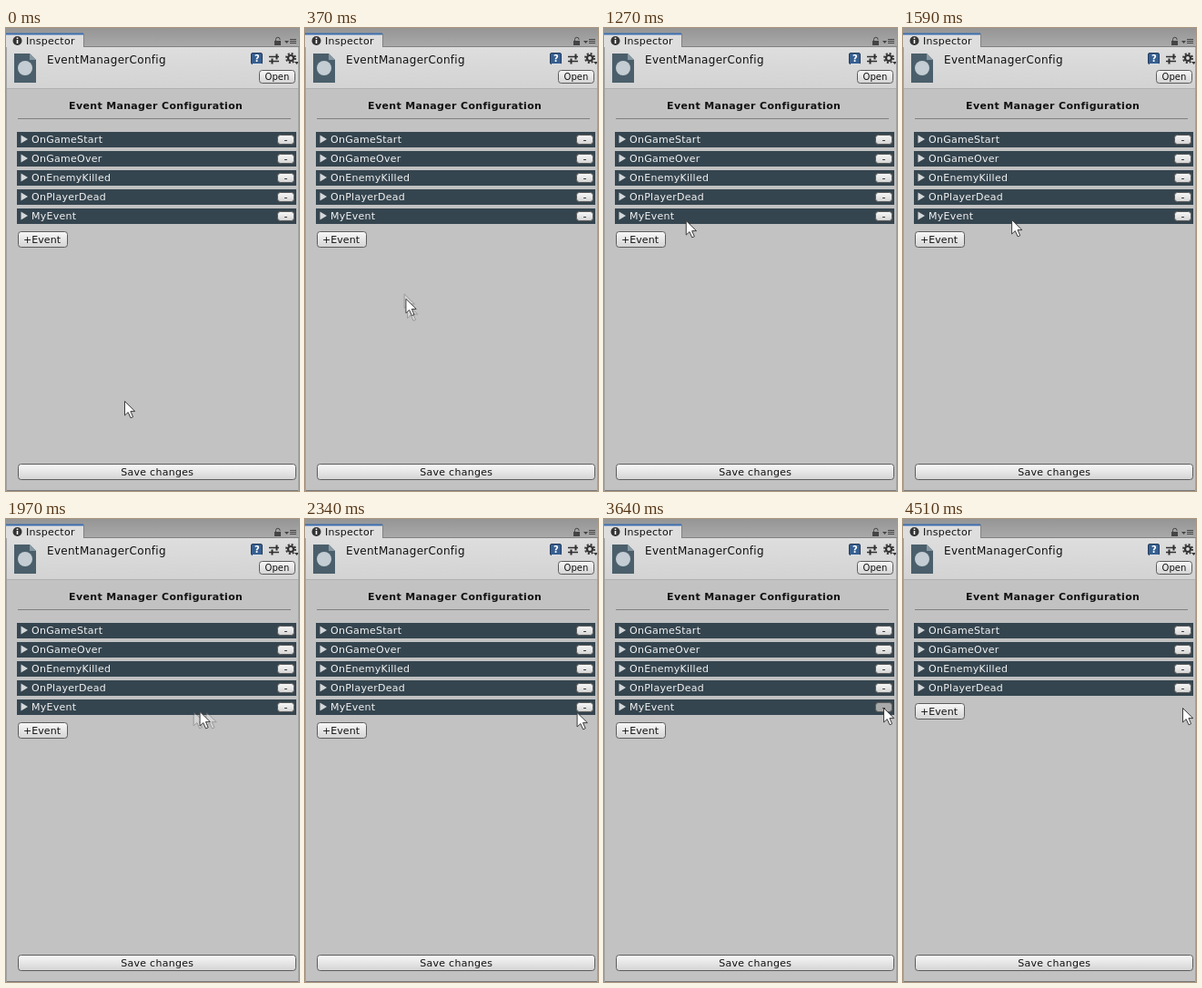
Write an HTML page that moves like this. It is 322 px wide and 508 px high and loops after 7640 ms.

```html
<!DOCTYPE html>
<html lang="en">
<head>
<meta charset="utf-8">
<title>Event manager inspector</title>
<style>
  html, body { margin: 0; width: 100%; height: 100%; overflow: hidden; background: #c2c2c2; }
  svg { display: block; width: 322px; height: 508px; }
  text { font: 11px "DejaVu Sans", sans-serif; letter-spacing: .27px; fill: #111; }
  .title { font-weight: bold; letter-spacing: .33px; }
  .asset { font-size: 12px; letter-spacing: .3px; }
  .small { font-size: 10px; letter-spacing: .1px; }
  .mid { text-anchor: middle; }
  .row text { fill: #f2f2f2; }
  .row .minus { fill: #222; }
  .button { fill: url(#face); stroke: #5c5c5c; }
</style>
</head>
<body>
<svg viewBox="0 0 322 508">
  <defs>
    <linearGradient id="face" x2="0" y2="1">
      <stop stop-color="#f8f8f8"/><stop offset="1" stop-color="#d4d4d4"/>
    </linearGradient>
    <linearGradient id="bar" x2="0" y2="1">
      <stop stop-color="#959595"/><stop offset="1" stop-color="#a9a9a9"/>
    </linearGradient>
    <linearGradient id="head" x2="0" y2="1">
      <stop stop-color="#dedede"/><stop offset="1" stop-color="#d3d3d3"/>
    </linearGradient>
    <path id="arrow" d="M.5 .5V16L4.2 12.6L7 18.8L9.6 17.7L6.9 11.6H11.8Z"
      fill="#fff" stroke="#3c3c3c" stroke-linejoin="round"/>
  </defs>

  <rect width="322" height="508" fill="#c2c2c2"/>
  <rect width="322" height="20" fill="url(#bar)"/>
  <rect y="20" width="322" height="46" fill="url(#head)"/>
  <path d="M0 66.5H322" stroke="#b0b0b0"/>
  <path d="M0 21V6H85V21" fill="#dedede"/>
  <path d="M0 6.5H85" stroke="#3d6fb0" stroke-width="2"/>
  <path d="M85.5 6V20M85 20.5H322" stroke="#828282"/>
  <circle cx="12.5" cy="14" r="5" fill="#333"/>
  <path d="M12.5 13V17M12.5 10.5V12" stroke="#fff" stroke-width="1.6"/>
  <text x="22" y="18">Inspector</text>

  <g fill="none" stroke="#444">
    <path d="M296.5 14V12.5A2.2 2.2 0 0 1 301 12.5V13"/>
    <rect x="295" y="14" width="7" height="5" fill="#444" stroke="none"/>
    <path d="M306 14H311L308.5 17Z" fill="#444" stroke="none"/>
    <path d="M312 12.5H319M312 14.5H319M312 16.5H319"/>
  </g>

  <path d="M9 28H26L33 35V60H9Z" fill="#4a5f6b"/>
  <path d="M26 28V35H33Z" fill="#8798a2"/>
  <circle cx="21" cy="44" r="8" fill="#c3cdd3"/>
  <text class="asset" x="45" y="39">EventManagerConfig</text>

  <rect x="269.5" y="27.5" width="12" height="12" rx="1.5" fill="#365f91" stroke="#263d5b"/>
  <path d="M271 39.5H281" stroke="#d9dfe6"/>
  <text class="small mid" x="276" y="37" style="fill:#fff;font-weight:bold">?</text>
  <g stroke="#2f2f2f" stroke-width="1.6">
    <path d="M289 31.5H300M289 36.5H300"/>
    <path d="M297.5 28.5V34.5M292.5 33.5V39.5" stroke-width="2"/>
  </g>
  <circle cx="313" cy="33" r="3" fill="none" stroke="#333" stroke-width="2.2"/>
  <circle cx="313" cy="33" r="5" fill="none" stroke="#333" stroke-width="2" stroke-dasharray="2 1.927"/>
  <path d="M317 37H322L319.5 40Z" fill="#333"/>
  <rect class="button" x="278.5" y="46.5" width="39" height="14" rx="3"/>
  <text class="small mid" x="298" y="57">Open</text>

  <text class="title mid" x="164.7" y="89">Event Manager Configuration</text>
  <path d="M13 99.5H313" stroke="#808080"/>

  <g id="rows"></g>
  <g id="add">
    <rect class="button" x="13.5" y="223.5" width="54" height="17" rx="3"/>
    <text x="19" y="236" style="letter-spacing:.05px">+Event</text>
  </g>
  <rect class="button" x="13.5" y="478.5" width="305" height="17" rx="3"/>
  <text class="mid" x="166.2" y="491">Save changes</text>
  <path d="M0 507.5H322" stroke="#777"/>
  <path d="M.5 21V508M321.5 21V508" stroke="#a2a2a2"/>

  <use class="ghost" href="#arrow" opacity=".3"/>
  <use class="ghost" href="#arrow" opacity=".3"/>
  <use id="cursor" href="#arrow"/>
</svg>
<script>
const LOOP = 7640, PRESS = 3640, REMOVE = 3860;
const $ = id => document.getElementById(id);

// Cursor tip: time, x, y
const path = [
  [50, 130, 409], [370, 110.5, 297], [800, 69, 216], [1590, 119, 210],
  [2340, 298.5, 212], [2540, 308, 210], [2690, 308, 210], [2790, 307, 207]
];

const eventNames = ['OnGameStart', 'OnGameOver', 'OnEnemyKilled', 'OnPlayerDead', 'MyEvent'];
$('rows').innerHTML = eventNames.map((name, i) => `
  <g class="row" transform="translate(0 ${114 + 21 * i})">
    <rect x="12" width="307" height="17" fill="#35454f"/>
    <path d="M16.5 3.5V12.5L24 8Z" fill="#d4d8da"/>
    <text x="28" y="12">${name}</text>
    <rect class="button" x="298.5" y="3.5" width="18" height="10" rx="3"/>
    <text class="minus mid" x="307.5" y="12">-</text>
  </g>`).join('');

const lastRow = $('rows').lastElementChild;
const lastButton = lastRow.querySelector('.button');
const ghosts = document.querySelectorAll('.ghost');

const slope = (i, axis) =>
  (path[i + 1][axis] - path[i][axis]) / (path[i + 1][0] - path[i][0]);

// Monotone tangent: no overshoot at turning points
function tangent(i, axis) {
  if (i === 0) return slope(0, axis);
  if (i === path.length - 1) return 0;
  const a = slope(i - 1, axis), b = slope(i, axis);
  return a * b > 0 ? 2 * a * b / (a + b) : 0;
}

function tipAt(t) {
  const last = path.length - 1;
  if (t <= path[0][0]) return path[0].slice(1);
  if (t >= path[last][0]) return path[last].slice(1);
  const i = path.findIndex(p => p[0] > t) - 1;
  const span = path[i + 1][0] - path[i][0];
  const u = (t - path[i][0]) / span, v = 1 - u;
  return [1, 2].map(axis =>
    v * v * (1 + 2 * u) * path[i][axis] + u * u * (3 - 2 * u) * path[i + 1][axis] +
    span * u * v * (v * tangent(i, axis) - u * tangent(i + 1, axis)));
}

const place = (node, [x, y]) => node.setAttribute('transform', `translate(${x} ${y})`);

function render(t) {
  place($('cursor'), tipAt(t));
  const before = tipAt(t - 22), after = tipAt(t + 22);
  const fast = t > 50 && Math.hypot(after[0] - before[0], after[1] - before[1]) > 10.5;
  place(ghosts[0], before);
  place(ghosts[1], after);
  ghosts.forEach(g => g.style.display = fast ? '' : 'none');

  const removed = t >= REMOVE;
  lastRow.style.display = removed ? 'none' : '';
  lastButton.style.fill = t >= PRESS ? '#a9a9a9' : '';
  place($('add'), [0, removed ? -21 : 0]);
}

const start = performance.now();
function tick() {
  render((performance.now() - start) % LOOP);
  requestAnimationFrame(tick);
}
tick();
</script>
</body>
</html>
```
